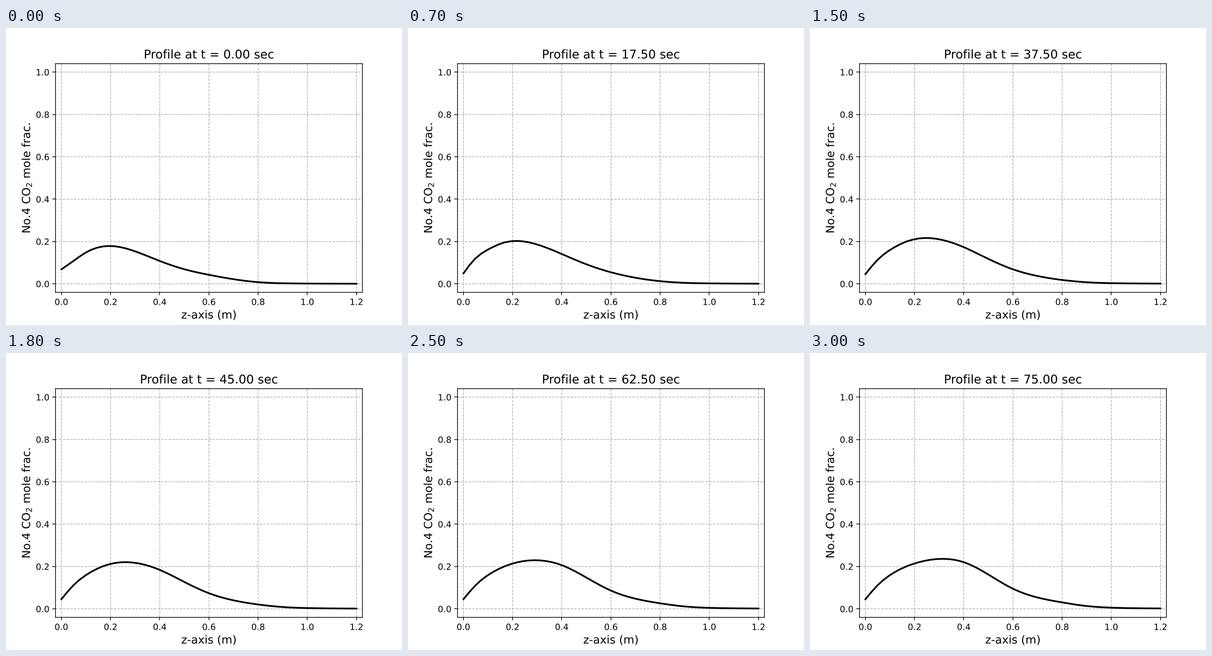
A matplotlib script for the animation above (3.1 s loop, 864x648 px).

```python
import numpy as np
import matplotlib.pyplot as plt
from matplotlib import patheffects
from matplotlib.animation import FuncAnimation

FRAMES = 31
INTERVAL = 100   # ms
STEP = 2.5       # simulated seconds per frame

# Draw text and lines as unhinted paths at subpixel positions.
plt.rcParams.update({
    "path.snap": False,
    "path.effects": [patheffects.Normal()],
    "text.hinting": "none",
})

# Key points of the concentration profile: position, first value, last value.
KEYS = np.array([
    (0.00, .0686, .0455),
    (0.05, .1090, .1120),
    (0.10, .1485, .1595),
    (0.20, .1788, .2145),
    (0.30, .1535, .2358),
    (0.40, .1080, .2205),
    (0.50, .0690, .1620),
    (0.60, .0427, .0950),
    (0.80, .0080, .0305),
    (0.90, .0028, .0133),
    (1.00, .0015, .0057),
    (1.20, .0007, .0020),
])


def spline(x, y, q):
    """Natural cubic spline through (x, y), evaluated at q."""
    n = len(x)
    h = np.diff(x)
    slope = np.diff(y) / h
    system, rhs = np.eye(n), np.zeros(n)
    for i in range(1, n - 1):
        system[i, i - 1:i + 2] = h[i - 1], 2 * (h[i - 1] + h[i]), h[i]
        rhs[i] = 6 * (slope[i] - slope[i - 1])
    m = np.linalg.solve(system, rhs)
    k = np.clip(np.searchsorted(x, q, side="right") - 1, 0, n - 2)
    b = (q - x[k]) / h[k]
    a = 1 - b
    return (a * y[k] + b * y[k + 1]
            + ((a**3 - a) * m[k] + (b**3 - b) * m[k + 1]) * h[k]**2 / 6)


def hump(u):
    return u * np.exp(-u**2)


z = np.linspace(0, 1.2, 51)
first = spline(KEYS[:, 0], KEYS[:, 1], z)
last = spline(KEYS[:, 0], KEYS[:, 2], z)

# The bed settles quickly near the inlet and almost linearly further along.
rate = np.minimum(0.2 / np.maximum(z, 0.01)**2 - 0.6, 8)


def profile(i):
    p = i / (FRAMES - 1)
    ease = np.expm1(-rate * p) / np.expm1(-rate)
    inlet_pulse = 0.055 * hump(z / 0.07) * hump(p / 0.29)
    return first + (last - first) * ease + inlet_pulse


fig, ax = plt.subplots(figsize=(6.4, 4.8), dpi=135)
line, = ax.plot(z, first, "k-", linewidth=2)
title = ax.set_title("", fontsize=14)
ax.set_xlabel("z-axis (m)", fontsize=13)
ax.set_ylabel("No.4 CO$_2$ mole frac.", fontsize=13, labelpad=3.5)
ax.set_xlim(-0.024, 1.224)
ax.set_ylim(-0.04, 1.04)
ax.set_xticks(np.linspace(0, 1.2, 7))
ax.set_yticks(np.linspace(0, 1, 6))
ax.grid(linestyle="--")


def update(i):
    line.set_ydata(profile(i))
    title.set_text(f"Profile at t = {i * STEP:.2f} sec")
    return line, title


anim = FuncAnimation(fig, update, frames=FRAMES, interval=INTERVAL, repeat=True)
plt.show()
```
